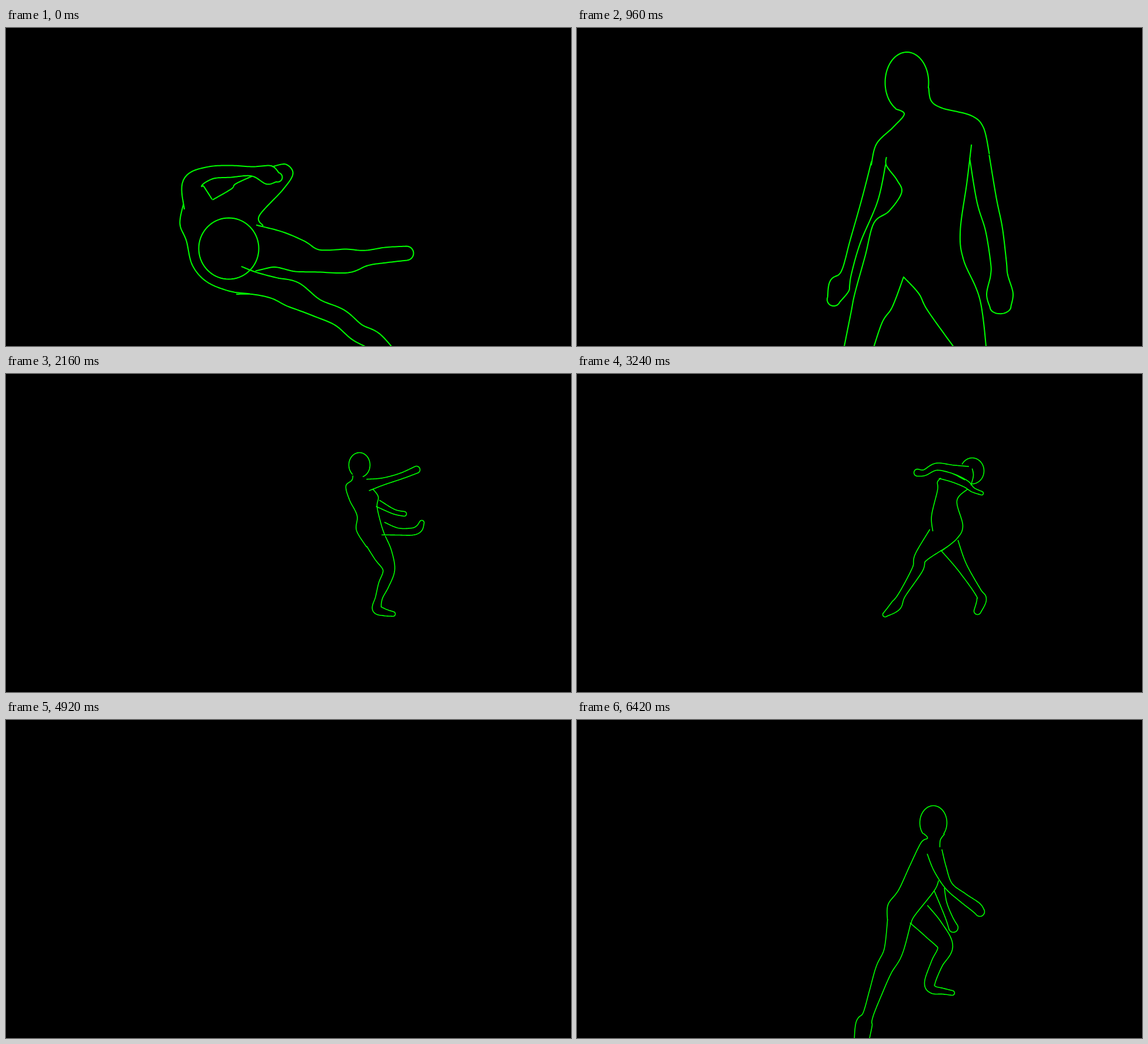
An HTML page with a canvas that plays this animation: 960 by 540 pixels, repeating every 6480 ms.

```html
<!DOCTYPE html>
<html lang="en">
<head>
<meta charset="utf-8">
<title>Dancer</title>
<style>
html, body { margin: 0; width: 100%; height: 100%; overflow: hidden; background: #000; }
canvas { display: block; }
</style>
</head>
<body>
<canvas id="stage" width="960" height="540"></canvas>
<script>
const LOOP = 6480, STEP = 60, SAMPLES = 72, FLOOR = 540;
const PARTS = ['head', 'back', 'front', 'armA', 'armB', 'legA', 'legB', 'neckA', 'neckB', 'fold'];

// Head: centre, radii, start and end angle in degrees.
// Other parts: joints "x,y" or "x,y,halfWidth"; the outline grows around them.
const seated = {
  head: [378, 374, 51, 52, 90, 450],
  back: '301,298 295,332 306,361 316,402 340,430 378,446 414,451',
  armA: '326,299,25 317,263,17 345,246,11 382,243,10 418,243,8 446,249,16 461,253,8',
  armB: '452,235 475,231 487,247 470,274 430,318 436,335',
  legA: '424,373,39 460,375,31 498,387,27 530,395,19 580,395,20 612,390,13 645,385,13 680,382,12',
  legB: '395,428,24 421,433,19 455,441,18 487,452,22 526,474,15 566,491,15 596,516,15 624,531,16 650,560,16',
  fold: '418,251 390,264 382,273 351,291'
};

const crouched = {
  head: [471, 279, 35, 42, 90, 450],
  back: '409,275 424,246 457,226 498,217 520,232 552,260 573,296 578,315 572,340',
  front: '562,292 560,305 562,320 572,340',
  armA: '421,285,13 411,325,15 403,358,10 413,405,10 425,440,10 431,455,26 432,472,38',
  armB: '557,342,16 567,362,14 562,383,14 542,393,9 505,399,9 476,403,16 456,402,8',
  legA: '402,298,23 362,307,16 334,322,15 304,335,7 285,343,8 262,349,9 246,352,7',
  legB: '431,297 427,320 465,320 494,322 462,332 425,352 416,349',
  neckA: '420,390 440,396 465,391',
  fold: '548,361 528,366 485,387'
};

const standing = {
  head: [625, 140, 33, 46, 120, 370],
  back: '594,253 594,266 610,288 617,307 598,335 575,353 562,402 546,460 540,490 526,560',
  front: '723,234 716,292 706,365 711,409 736,470 747,560',
  armA: '582,262,11 569,317,12 547,380,8 533,429,8 523,448,16 514,469,10',
  armB: '735,252,15 746,318,15 757,362,13 764,412,12 765,432,13 766,460,20 767,480,16',
  legA: '569,560 587,505 603,480 620,435',
  legB: '620,435 643,460 658,488 710,560',
  neckA: '608,180 621,188 604,208 579,233 571,265',
  neckB: '658,148 662,168 679,179 722,190 741,208 750,248'
};

const kicking = {
  head: [600, 154, 18, 21, 130, 430],
  back: '589,172 587,180 577,190 583,213 596,240 595,265 612,293',
  front: '623,195 632,208 630,225 637,255 643,273',
  armA: '614,188,10 640,182,6 670,173,5 697,162,6',
  armB: '631,219,6 658,233,4 676,237,4',
  legA: '628,283,18 640,306,16 650,332,10 641,358,9 633,380,6 630,398,8 642,404,6 657,407,4',
  legB: '640,262,11 665,267,6 690,267,6 701,262,6 706,252,4'
};

const striding = {
  head: [671, 164, 20, 22, 210, 450],
  back: '618,176 612,183 612,197 602,240 604,266',
  front: '663,195 645,215 655,257 645,279 619,300',
  armA: '662,168,12 637,161,7 610,157,6 590,167,5 578,167,6',
  armB: '616,170,7 638,176,7 660,186,6 672,196,4 687,202,3',
  legA: '614,278,21 584,310,11 578,331,9 552,374,6 541,393,9 523,408,4',
  legB: '632,290,17 653,326,9 680,368,6 687,382,8 680,402,6',
  neckB: '671,160 673,172 669,188'
};

const running = {
  head: [605, 174, 23, 29, 140, 400],
  back: '588,192 595,200 584,208 565,247 546,288 528,313 527,340',
  front: '614,272 606,290 573,332 567,346',
  armA: '607,223,13 616,251,11 631,281,7 655,301,8 677,317,9 684,325,8',
  armB: '615,287,9 622,311,6 632,336,6 639,352,8',
  legA: '547,341,20 537,392,16 521,423,14 507,462,11 494,500,9 487,517,14 481,560,11',
  legB: '580,329,21 605,355,18 625,384,13 611,413,10 599,445,9 604,457,7 621,460,5 637,463,4',
  neckB: '624,193 617,203 616,215'
};

const mix = (a, b, k) => a + (b - a) * k;
const clamp = (v, lo, hi) => Math.max(lo, Math.min(hi, v));
const range = (n, f) => Array.from({ length: n + 1 }, (_, i) => f(i / n));

function headArc([x, y, rx, ry, from, to]) {
  return range(SAMPLES, u => {
    const a = mix(from, to, u) * Math.PI / 180;
    return [x + rx * Math.cos(a), y + ry * Math.sin(a), 0];
  });
}

// Catmull-Rom curve through the joints, widths included.
function curve(text) {
  const pts = text.split(' ').map(s => s.split(',').map(Number));
  const last = pts.length - 1;
  const at = (i, axis) => pts[clamp(i, 0, last)][axis] || 0;
  return range(SAMPLES, u => {
    const i = Math.min(last - 1, Math.floor(u * last)), f = u * last - i;
    return [0, 1, 2].map(axis => {
      const [w, x, y, z] = [-1, 0, 1, 2].map(n => at(i + n, axis));
      return x + f / 2 * (y - w + f * (2 * w - 5 * x + 4 * y - z + f * (3 * (x - y) + z - w)));
    });
  });
}

// A part hidden in a pose shrinks to a point on the body.
function build(pose) {
  const out = { head: headArc(pose.head), back: curve(pose.back) };
  for (const name of PARTS) {
    out[name] ||= pose[name] ? curve(pose[name]) : range(SAMPLES, () => out.back[0]);
  }
  return out;
}

const key = (time, pose, scale = 1, dx = 0, line = 1.6) => ({ time, pose, scale, dx, line });
const [sit, crouch, stand, kick, stride, run] =
  [seated, crouched, standing, kicking, striding, running].map(build);

const keys = [
  key(0, sit, 1, 0, 2),
  key(480, crouch, 1, 0, 2),
  key(960, stand, 1.12, -140, 2),
  key(1440, stand, 1, 0, 2),
  key(2160, kick),
  key(3240, stride),
  key(3780, stride, 1, 80),
  key(4380, run, 1.1, 90),
  key(4620, run, 1.1, 110),
  key(4860, run, 1.15, 440),
  key(5340, run, 1, 500),
  key(5880, run, 1, 90),
  key(6420, run),
  key(LOOP, run)
];

const place = ({ scale, dx }, [x, y, w]) => [x * scale + dx, FLOOR - (FLOOR - y) * scale, w * scale];

// Both sides of a limb, joined by a rounded tip.
function outline(spine) {
  const last = spine.length - 1;
  const sides = spine.map(([x, y, w], i) => {
    const a = spine[Math.max(0, i - 3)], b = spine[Math.min(last, i + 3)];
    const dx = b[0] - a[0], dy = b[1] - a[1], len = Math.hypot(dx, dy) || 1;
    return { x, y, w, tx: dx / len, ty: dy / len };
  });
  const side = sign => ({ x, y, w, tx, ty }) => [x - sign * ty * w, y + sign * tx * w];
  const end = sides[last], depth = Math.min(end.w, 12);
  const tip = range(12, u => {
    const across = Math.cos(u * Math.PI) * end.w, along = Math.sin(u * Math.PI) * depth;
    return [end.x - end.ty * across + end.tx * along, end.y + end.tx * across + end.ty * along];
  });
  return [...sides.map(side(1)), ...tip, ...sides.map(side(-1)).reverse()];
}

const ctx = document.getElementById('stage').getContext('2d');
ctx.strokeStyle = '#0f0';
ctx.lineJoin = 'round';
ctx.translate(0.5, 0.5);

function draw(time) {
  const i = keys.findIndex(k => k.time > time) - 1;
  const a = keys[i], b = keys[i + 1];
  const k = (time - a.time) / (b.time - a.time);
  ctx.clearRect(-1, -1, 962, 542);
  ctx.lineWidth = mix(a.line, b.line, k);
  ctx.beginPath();
  for (const name of PARTS) {
    const spine = a.pose[name].map((p, n) => {
      const from = place(a, p), to = place(b, b.pose[name][n]);
      return from.map((v, axis) => mix(v, to[axis], k));
    });
    outline(spine).forEach(([x, y], n) => n ? ctx.lineTo(x, y) : ctx.moveTo(x, y));
  }
  ctx.stroke();
}

const start = performance.now();
function tick() {
  const time = (performance.now() - start) % LOOP;
  draw(Math.floor(time / STEP) * STEP);
  requestAnimationFrame(tick);
}
tick();
</script>
</body>
</html>
```
